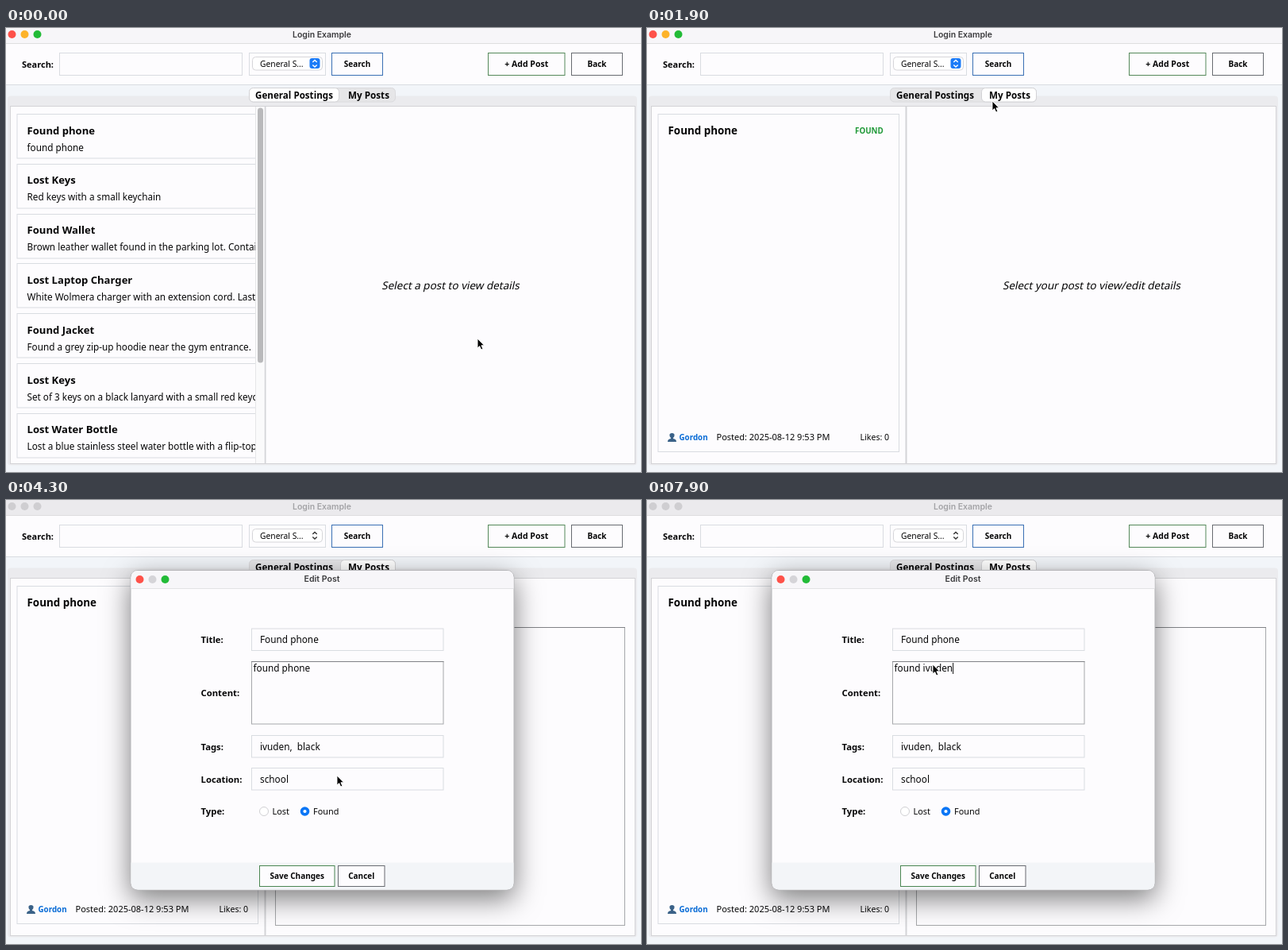
An HTML page for the animation above (8 s loop, 800 by 559 pixels).

```html
<!DOCTYPE html>
<html lang="en">
<head>
<meta charset="utf-8">
<title>Lost and found</title>
<style>
html, body { margin: 0; width: 100%; height: 100%; overflow: hidden; background: #f2f5f9; }
svg { display: block; }
text { font-family: "Noto Sans", "Open Sans", sans-serif; white-space: pre; }
.win { font-family: Inter, sans-serif; font-weight: 600; }
</style>
</head>
<body>
<svg id="stage" width="800" height="559" viewBox="0 0 800 559"></svg>
<script>
const INK = "#060607", BLUE = "#0a6cd6", GREEN = "#229a3a", EDGE = "#d9dce1", PAPER = "#fdfcfe";
const DURATION = 8000;

// Markup helpers
const rect = (x, y, w, h, fill, stroke = "none", rx = 0, extra = "") =>
  `<rect x="${x}" y="${y}" width="${w}" height="${h}" fill="${fill}" stroke="${stroke}" rx="${rx}" ${extra}/>`;
const text = (x, y, s, size, fill = INK, extra = "") =>
  `<text x="${x}" y="${y}" font-size="${size}" fill="${fill}" ${extra}>${s}</text>`;
const bold = (x, y, s, size, fill = INK, extra = "") =>
  text(x, y, s, size, fill, `font-weight="700" ${extra}`);
const mid = (x, y, s, size, fill, extra = "") => bold(x, y, s, size, fill, `text-anchor="middle" ${extra}`);
const group = (id, body, extra = "") => `<g id="${id}" ${extra}>${body}</g>`;
const path = (d, fill, stroke = "none", w = 1) =>
  `<path d="${d}" fill="${fill}" stroke="${stroke}" stroke-width="${w}"/>`;
const dot = (x, y, r, fill, stroke = "none") =>
  `<circle cx="${x}" cy="${y}" r="${r}" fill="${fill}" stroke="${stroke}"/>`;
const lights = (x, y, colors) => colors.map((c, i) => dot(x + 16 * i, y, 5, c)).join("");
const button = (x, y, w, h, label, stroke, size = 10) =>
  rect(x, y, w, h, PAPER, stroke) + mid(x + w / 2, y + h / 2 + 3.5, label, size);
// Scroll pane: pale outline with a darker top edge
const pane = (x, y, w, h) => rect(x, y, w, h, PAPER, "#a6a8ab") + path(`M${x - .5} ${y}h${w + 1}`, "none", "#808286");
const hint = s =>
  `<g transform="translate(560 329) skewX(-12)">${text(0, 0, s, 13.5, INK, 'text-anchor="middle"')}</g>`;
const person = (x, y) =>
  path(`M${x} ${y + 11}q0-3.4 4-4v-1q-1.6-1.2-1.6-3.4q0-2.6 3.1-2.6t3.1 2.6q0 2.200-1.600 3.400v1q4 .6 4 4z`, "#3b6288");
const tofu = (x, y) => rect(x, y, 5, 8, "none", "#777", 0, 'stroke-width=".8"');
const chevrons = color => path("M386.3 43l2.7-2.6 2.7 2.6M386.3 46.4l2.7 2.6 2.7-2.6", "none", color, 1.4);
const titleBar = (id, fill, ink, colors) => group(id,
  rect(0, 0, 800, 19.5, fill) + lights(7.5, 8, colors) + mid(398, 11.5, "Login Example", 10.5, ink, 'class="win"'));

const posts = [
  ["Found phone", "found phone"],
  ["Lost Keys", "Red keys with a small keychain"],
  ["Found Wallet", "Brown leather wallet found in the parking lot. Contains cards"],
  ["Lost Laptop Charger", "White Wolmera charger with an extension cord. Last seen"],
  ["Found Jacket", "Found a grey zip-up hoodie near the gym entrance."],
  ["Lost Keys", "Set of 3 keys on a black lanyard with a small red keychain"],
  ["Lost Water Bottle", "Lost a blue stainless steel water bottle with a flip-top lid"]
];

const frame =
  rect(0, 0, 800, 559, "#f2f5f9") +
  titleBar("active", "#f7f6f9", "#3b3b3d", ["#fe5149", "#fdb32a", "#22bb37"]) +
  titleBar("inactive", "#ebeaed", "#a3a3a6", Array(3).fill("#cfced1")) +
  rect(0, 19, 800, 1, "#dededf") +
  rect(0, 20, 800, 51, PAPER) + rect(0, 71, 800, 1, EDGE) +
  bold(20, 49.5, "Search:", 11) +
  rect(67.5, 31.5, 230, 28, PAPER, EDGE) +
  rect(306.5, 31.5, 96, 28, PAPER, EDGE) +
  rect(310.5, 36.5, 88, 16.5, "#fff", "#d6d6d9", 4) +
  text(320, 48.5, "General S...", 10.3) +
  group("comboOn", rect(382.5, 38, 13, 13, "#1b7bf7", "none", 3) + chevrons("#fff")) +
  group("comboOff", chevrons("#333")) +
  button(410.5, 31.5, 64, 28, "Search", "#3a70b4") +
  button(607.5, 31.5, 96.5, 28, "+ Add Post", "#55895a", 10.5) +
  button(712.5, 31.5, 64, 28, "Back", "#686b71") +
  rect(2, 85.5, 793, 465, "#ebebee", "none", 4) +
  rect(5.5, 98.5, 787, 450, PAPER, "#d3d3d6") +
  rect(306.5, 75.5, 184, 17.5, "#e6e6e8", "#dadadd", 5) +
  rect(306.5, 75.5, 113, 17.5, "#fff", "#d2d2d5", 5, 'id="tabGeneral"') +
  rect(420.5, 75.5, 70, 17.5, "#ececee", "#cfcfd3", 5, 'id="tabPress"') +
  rect(421.5, 75.5, 69, 17.5, "#fff", "#d2d2d5", 5, 'id="tabMine"') +
  mid(363, 88.5, "General Postings", 11.6) + mid(457, 88.5, "My Posts", 11.7) +
  rect(325.5, 99, 2, 449, "#d4d4d7");

const general = `<clipPath id="list"><rect x="6" y="99" width="308.5" height="449"/></clipPath>` +
  group("cards", posts.map(([title, note], i) => {
    const y = 108 + 62.8 * i;
    return rect(14, Math.round(y) + .5, 320, 55.5, PAPER, EDGE) +
      bold(26.5, y + 25.5, title, 13.1) + text(26.5, y + 46.5, note, 11.75);
  }).join(""), 'clip-path="url(#list)"') +
  rect(314, 99, 11.5, 449, "#fafafb") + rect(314, 99, 1, 449, "#e6e6e8") +
  rect(317, 100.5, 7, 321, "#b9b9bb", "none", 3.5) +
  hint("Select a post to view details");

const mine = rect(14, 108.5, 303.5, 425, PAPER, EDGE) +
  bold(26.5, 133.5, "Found phone", 13.4) + bold(262, 132.7, "FOUND", 9.8, GREEN) +
  person(26, 510) + bold(40.5, 519, "Gordon", 9.8, BLUE) +
  text(87.5, 519, "Posted: 2025-08-12 9:53 PM", 11) + text(268.5, 519, "Likes: 0", 10.6);

const detail = bold(348, 139, "Found phone", 19.9) +
  pane(339.5, 160.5, 440, 375) +
  text(365, 189, "Content: found phone", 11.85) +
  text(365, 212.5, "Tags: ivuden,  black", 11.9, BLUE) +
  text(365, 236, "Location: school", 11.85) +
  bold(365, 260.5, "Type: FOUND", 13.2, GREEN) +
  text(365, 285, "Posted: 2025-08-12 9:53 PM", 12.4) +
  person(365.5, 298.5) + bold(380.5, 308, "Posted by: Gordon (Credibility: 0 pts)", 11.8, BLUE) +
  text(365, 331.5, "Likes: 0", 11.9) +
  rect(365.5, 340.5, 89, 26, PAPER, "#c2952e", 0, 'id="editButton"') +
  path("M378 353.5l2.2-1.7h5.3q1 .2 1 1.7t-1 1.7h-5.3zM380.2 351.8v3.4", "#8b8b8b", "#444", .8) +
  tofu(388.5, 349.5) + bold(397.5, 357, "Edit Post", 10.2) +
  rect(365.5, 374.5, 10, 10, "#27a33c", "none", 2) + path("M367.5 379.5l2.3 2.6 4-5.6", "none", "#fff", 1.5) +
  bold(379, 383, "Resolved by: Gordon", 10, GREEN) +
  text(365, 401.5, "Credited to: Mason", 10.3, "#6b6e73") +
  rect(365.5, 410.5, 96, 26, PAPER, "#b24a4c") +
  path("M378 419h10M379 419l1 9.5h6l1-9.5M381.5 420.5l.4 6.5M384.5 420.5l-.4 6.5", "#d4d4d6", "#77777a", 1) +
  tofu(390, 419.5) + bold(399, 427, "Delete Post", 10);

const field = (y, value) => rect(309.5, y, 241.5, 27.5, PAPER, EDGE) + text(320, y + 18, value, 11.8);
const label = (y, s) => bold(245.5, y, s, 11.3);
const dialog =
  rect(157, 88.5, 483, 402.5, PAPER, "#b5b5b8", 9, 'style="filter:drop-shadow(0 11px 17px rgba(0,0,0,.5))"') +
  path("M157.5 111V98q0-9 9-9h464q9 0 9 9v13z", "#f7f6f9") + rect(157.5, 111, 482, 1, "#e2e2e5") +
  path("M157.5 456.5h482V482q0 8.5-9 8.5h-464q-9 0-9-8.5z", "#f3f5f8") +
  lights(168.5, 100, ["#fe5149", "#d5d4d8", "#22bb37"]) + mid(398, 103, "Edit Post", 10.6, "#3b3b3d", 'class="win"') +
  label(180, "Title:") + label(247, "Content:") + label(314.5, "Tags:") + label(355.5, "Location:") + label(396, "Type:") +
  field(162, "Found phone") + field(296.5, "ivuden,  black") + field(337.5, "school") +
  pane(309.5, 203.5, 241.5, 78.5) +
  text(311.5, 215.5, "", 11.8, INK, 'id="content"') +
  rect(0, 205, 1, 14, "#111", "none", 0, 'id="caret"') +
  dot(325, 392, 5.5, "#fff", "#d0d0d3") + text(335.5, 396, "Lost", 10.9) +
  dot(376.5, 392, 5.8, "#0a76f6") + dot(376.5, 392, 2.1, "#fff") + text(387, 396, "Found", 10.9) +
  button(319.5, 460.5, 94.5, 26, "Save Changes", "#4a8652") +
  button(418.5, 460.5, 58.5, 26, "Cancel", "#686b71");

const pointer = `<circle id="ring" r="17.3" fill="none" stroke="#111" stroke-width="1.5"/>` +
  `<path d="M0 0V12L2.7 9.5 4.7 14 6.8 13 4.9 8.7H8.5Z" fill="#000" stroke="#fff" stroke-width=".9"/>`;

document.getElementById("stage").innerHTML = frame + group("general", general) + group("mine", mine) +
  group("mineHint", hint("Select your post to view/edit details")) + group("detail", detail) +
  group("dialog", dialog) + group("pointer", pointer);

const $ = id => document.getElementById(id);
const show = (id, on) => { $(id).style.display = on ? "" : "none"; };
const clamp = (v, lo, hi) => Math.min(hi, Math.max(lo, v));
const within = (t, a, b) => t >= a && t < b;

// Pointer stops: time, x, y
const stops = [
  [0, 594, 391], [200, 594, 391], [1300, 453, 84], [1600, 453, 84], [1900, 435, 92],
  [2400, 250, 150], [2600, 250, 150], [2900, 335, 141], [3800, 417, 347],
  [4400, 417, 347], [5200, 347.5, 215.5], [5500, 347.5, 215.5], [6200, 360, 207], [DURATION, 360, 207]
];
const clicks = [[1600, 1800], [2500, 2700], [4100, 4300], [5200, 5400]];
const keyTimes = [7000, 7200, 7400, 7600, 7700, 7900];

function pointerAt(t) {
  const i = stops.findIndex(s => s[0] > t);
  const [t0, x0, y0] = stops[i - 1], [t1, x1, y1] = stops[i];
  const k = (t - t0) / (t1 - t0), e = k * k * (3 - 2 * k);
  return [x0 + (x1 - x0) * e, y0 + (y1 - y0) * e];
}

function editContent(t) {
  const moved = clamp((t - 5500) / 100, 0, 6);
  const erased = clamp((t - 6300) / 100, 0, 5);
  const typed = keyTimes.filter(k => k <= t).length;
  const value = "found phone".slice(0, 11 - erased) + "ivuden".slice(0, typed);
  const at = moved < 6 ? 5 + moved : value.length;
  $("content").textContent = value;
  show("caret", t >= 5200);
  if (t >= 5200) $("caret").setAttribute("x", 311.5 + $("content").getSubStringLength(0, at));
}

function draw(now) {
  const t = Math.floor(now % DURATION / 100) * 100;
  const own = t >= 1600, opened = t >= 2600, modal = t >= 4200;
  show("tabGeneral", !own);
  show("tabPress", within(t, 1400, 1600));
  show("tabMine", own);
  show("general", !own);
  show("mine", own);
  show("mineHint", own && !opened);
  show("detail", opened);
  show("dialog", modal);
  for (const id of ["active", "comboOn"]) show(id, !modal);
  for (const id of ["inactive", "comboOff"]) show(id, modal);
  $("editButton").setAttribute("stroke", within(t, 3900, 4200) ? "#8c6a1c" : "#c2952e");
  if (modal) editContent(t);
  show("ring", clicks.some(([a, b]) => within(t, a, b)));
  $("pointer").setAttribute("transform", `translate(${pointerAt(t)})`);
  requestAnimationFrame(draw);
}
requestAnimationFrame(draw);
</script>
</body>
</html>
```
